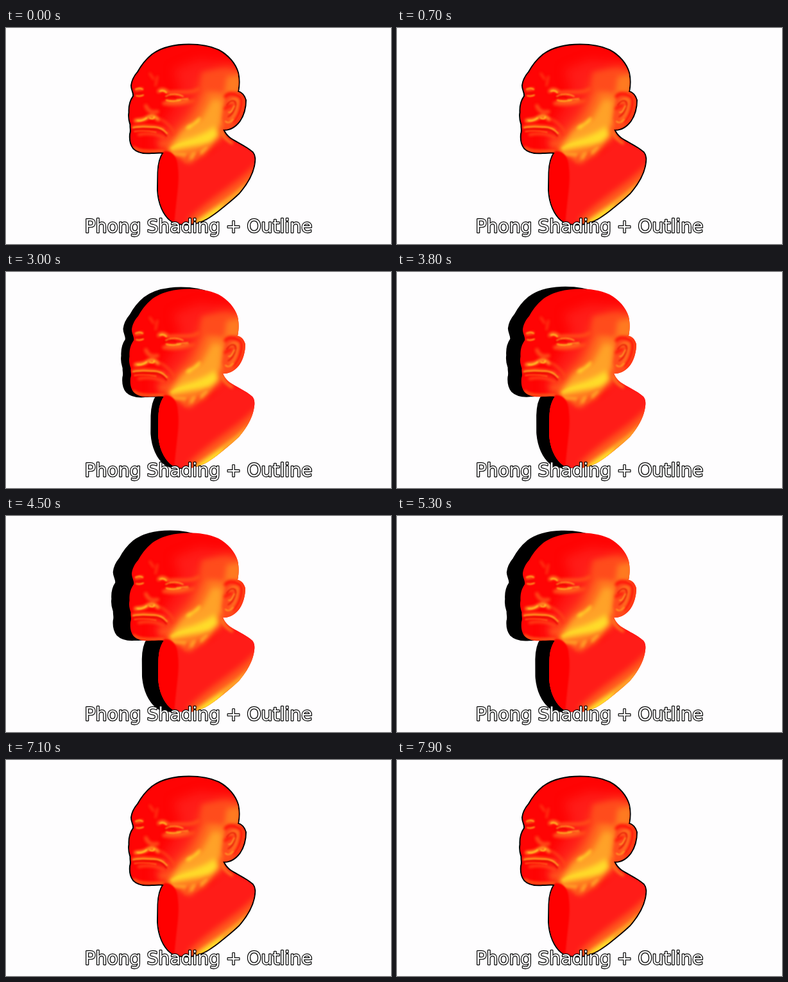
These frames come from a looping animation (600x338 px, 8 s). An HTML page:

```html
<!DOCTYPE html>
<html lang="en">
<head>
<meta charset="utf-8">
<title>Phong Shading + Outline</title>
<style>
  @property --d { syntax: '<number>'; inherits: true; initial-value: 0; }
  html, body { margin: 0; width: 100%; height: 100%; overflow: hidden; background: #fefdfe; }
  svg { display: block; width: 100vw; height: 100vh; }

  /* --d is how far the black hull has slid to the left */
  .hull {
    fill: #000; stroke: #000; stroke-width: 4; stroke-linejoin: round;
    transform-origin: 0 0;
    transform: translate(calc(var(--d) * -1.12px), calc(var(--d) * -.08px)) skewX(calc(var(--d) * .057deg));
    animation: slide 8s linear infinite;
  }
  @keyframes slide {
    0%, 25% { --d: 0; }
    36.25% { --d: 10; }
    47.5% { --d: 20.5; }
    54% { --d: 25.5; }
    58.5% { --d: 27.5; }
    62% { --d: 26; }
    66.25% { --d: 22.5; }
    70% { --d: 18; }
    81.25% { --d: 5.8; }
    88%, 100% { --d: 0; }
  }

  .b1 { filter: blur(.8px); }
  .b2 { filter: blur(2px); }
  .b4 { filter: blur(4px); }
  .b8 { filter: blur(8px); }
  .line { fill: none; stroke-linecap: round; stroke-linejoin: round; }
  .red { fill: #ff0404; }
  .warm { fill: #ff1c18; }
  .rust { fill: #ff4c1c; }
  .orange { fill: #ff7a20; }
  .amber { fill: #ffa228; }
  .yellow { fill: #ffde2a; }
  .s-dark { stroke: #e00800; }
  .s-red { stroke: #ff1008; }
  .s-rust { stroke: #ff4a18; }
  .s-orange { stroke: #ff7a20; }
  .s-amber { stroke: #ffa428; }
  .s-yellow { stroke: #ffd028; }
  text {
    font: 28.2px "DejaVu Sans", Verdana, sans-serif; text-anchor: middle;
    fill: #fff; stroke: #000; stroke-width: 2.4; stroke-linejoin: round; paint-order: stroke;
  }
</style>
</head>
<body>
<svg viewBox="0 0 600 338">
  <defs>
    <path id="bust" d="M285 26.5C262 26.5 241 32 228 42C217 51 211 60 206 69C200 76 197 82 196 90C196 97 200 101 199 107C194 114 192 122 192.500 132C191 141 193 146 194.500 151C194 157 196 160 194 166C193 176 195 183 199 188C206 195 216 196 227 195C235 195 241 194 246 195C240 203 238 213 237.500 226L237 253C238 275 246 292 257 301C265 307 280 308 292 306C307 303 317 296 329 287C341 277 353 268 363 258C375 244 383 230 386 216C388 206 388 200 384 195C374 186 358 179 349 173C343 168 340 164 338 158.500C349 160 358 153 364 145C370 136 373 124 373 113C370 103 365 101 361 100C363 90 363 79 361 70C357 56 346 43 331 35C316 28 300 26.500 285 26.500Z"/>
    <clipPath id="inside"><use href="#bust"/></clipPath>
  </defs>

  <use href="#bust" class="hull"/>
  <use href="#bust" class="red"/>

  <g clip-path="url(#inside)">
    <!-- skull and cheek -->
    <g class="b8">
      <path class="warm" d="M260 66L300 50L362 56L368 150L335 190L230 192L232 165L258 130L272 92Z"/>
      <path class="rust" d="M304 78L340 60L374 66L368 150L335 182L272 192L256 168L284 134L298 104Z"/>
      <path class="orange" d="M316 94L340 84L350 118L334 152L312 178L262 192L266 166L296 140Z"/>
    </g>
    <g class="b4">
      <path class="rust" d="M305 70C325 66 345 66 366 70L364 96L340 102L306 96Z"/>
      <path class="orange" d="M344 76L368 72L366 102L340 104Z"/>
      <path class="amber" d="M322 112L336 114L334 150L318 176L270 194L256 184L280 156L306 142Z"/>
      <path class="yellow" d="M250 192C262 182 274 176 290 172C306 166 318 160 326 154L332 168L314 186L286 196Z"/>
      <path class="orange" d="M236 176L262 170L262 186L240 190Z" opacity=".55"/>
    </g>
    <g class="b2">
      <path class="yellow" d="M280 157C282 153 286 150 290 150L302 139C306 144 298 150 292 153C288 158 283 160 280 157Z" opacity=".8"/>
      <path class="yellow" d="M256 188C266 182 282 179 304 176L308 184L290 193L260 194Z"/>
      <path class="line s-orange" stroke-width="3.500" d="M199 187C206 194 225 193 246 193"/>
    </g>

    <!-- neck and shoulders -->
    <g class="b4">
      <path class="warm" d="M246 204L284 206L308 202L330 185L342 170L396 192L390 226L336 270L290 312L230 312L232 220Z"/>
      <path class="rust" d="M394 206C366 240 330 254 282 300L300 314L350 282L394 236Z"/>
      <path class="orange" d="M392 222C370 248 336 265 294 300L306 312L350 280L392 240Z"/>
      <path class="orange" d="M250 193L322 180L310 198L296 204L286 212L270 203Z"/>
    </g>
    <g class="b2">
      <path class="amber" d="M376 240C360 258 338 271 318 285C308 292 298 299 290 306L312 306L336 286L366 260Z"/>
      <path class="yellow" d="M340 274L318 289L296 305L312 303L332 287Z"/>
      <path class="line s-amber" stroke-width="4" d="M250 196L280 198M293 196L289 203M312 187L304 195"/>
      <path class="line s-rust" stroke-width="3" d="M283 199L280 210M301 194L296 204"/>
      <path class="line s-orange" stroke-width="4" d="M337 163C339 171 344 176 352 180"/>
    </g>
    <path class="b1" fill="#ff0000" d="M246 193C257 190 267 200 268 219C271 242 265 266 262 310L232 306L232 225Z"/>

    <!-- brows, eyes and nose -->
    <g class="b2">
      <path class="line s-orange" stroke-width="5" d="M238 99C242 95 247 96 251 99"/>
      <path class="line s-rust" stroke-width="6" d="M254 101C268 98 284 104 300 96M246 118C262 121 278 119 292 114"/>
      <path class="line s-orange" stroke-width="3" d="M203 98L212 95M250 114C263 117 273 116 284 112"/>
      <path class="line s-rust" stroke-width="2.500" d="M224 71L230 80M236 76L233 90"/>
      <path class="line s-rust" stroke-width="6" d="M218 122C221 130 227 133 236 131"/>
      <path class="line s-amber" stroke-width="5" d="M202 145C209 143 215 145 220 140C226 136 233 138 237 143"/>
      <path class="line s-rust" stroke-width="3" d="M242 143C252 149 258 155 262 164"/>
    </g>
    <g class="b1">
      <path class="line s-yellow" stroke-width="1.800" d="M202 96C206 94 210 94 213 96M203 106C207 107 210 107 214 105M250 113C257 115 264 115 272 113M240 99C244 97 247 98 250 101"/>
      <path class="line s-dark" stroke-width="1.300" d="M201 103C206 100 210 101 214 103M247 109C253 106 260 106 266 110C273 112 280 112 286 110"/>
      <path class="line s-amber" stroke-width="1.600" d="M249 107C258 102 269 103 276 107M266 112L284 111"/>
      <path class="line s-yellow" stroke-width="2" d="M205 145C210 146 215 144 219 141M224 141C228 143 231 142 231 139"/>
    </g>

    <!-- mouth and chin -->
    <g class="b2">
      <path class="line s-orange" stroke-width="3.500" d="M198 155C214 152 234 153 246 159"/>
      <path class="line s-rust" stroke-width="4" d="M207 167C222 164 236 166 246 172M252 162L254 172"/>
    </g>
    <g class="b1">
      <path class="line s-yellow" stroke-width="1.500" d="M198 156C209 153 221 155 230 155C239 155 246 159 251 165"/>
      <path class="line s-dark" stroke-width="1.800" d="M197 159C209 156 220 158 230 158C239 158 245 162 250 169"/>
      <path class="line s-orange" stroke-width="1.300" d="M200 162C212 160 224 161 234 163"/>
    </g>

    <!-- ear -->
    <g class="b2">
      <path class="rust" d="M342 106C352 98 371 98 374 113C373 135 360 157 343 158L337 142Z"/>
      <path class="line s-red" stroke-width="5" d="M342 107C347 100 358 103 367 108C369 122 364 138 356 147"/>
      <path class="line s-orange" stroke-width="4" d="M349 116C356 108 363 110 362 119C360 130 356 139 350 145"/>
      <path class="line s-red" stroke-width="4" d="M341 126L351 121"/>
    </g>
    <g class="b1">
      <path class="line s-dark" stroke-width="1.300" d="M344 121C350 111 358 112 358 120C356 129 352 136 346 139"/>
      <path class="line s-amber" stroke-width="1.800" d="M347 132C351 133 353 128 356 122M342 146C346 150 351 147 354 143"/>
      <path class="line s-rust" stroke-width="1.800" d="M359 102C367 104 371 111 370 120C367 139 356 153 343 156"/>
    </g>
  </g>

  <text x="300" y="320">Phong Shading + Outline</text>
</svg>
</body>
</html>
```
